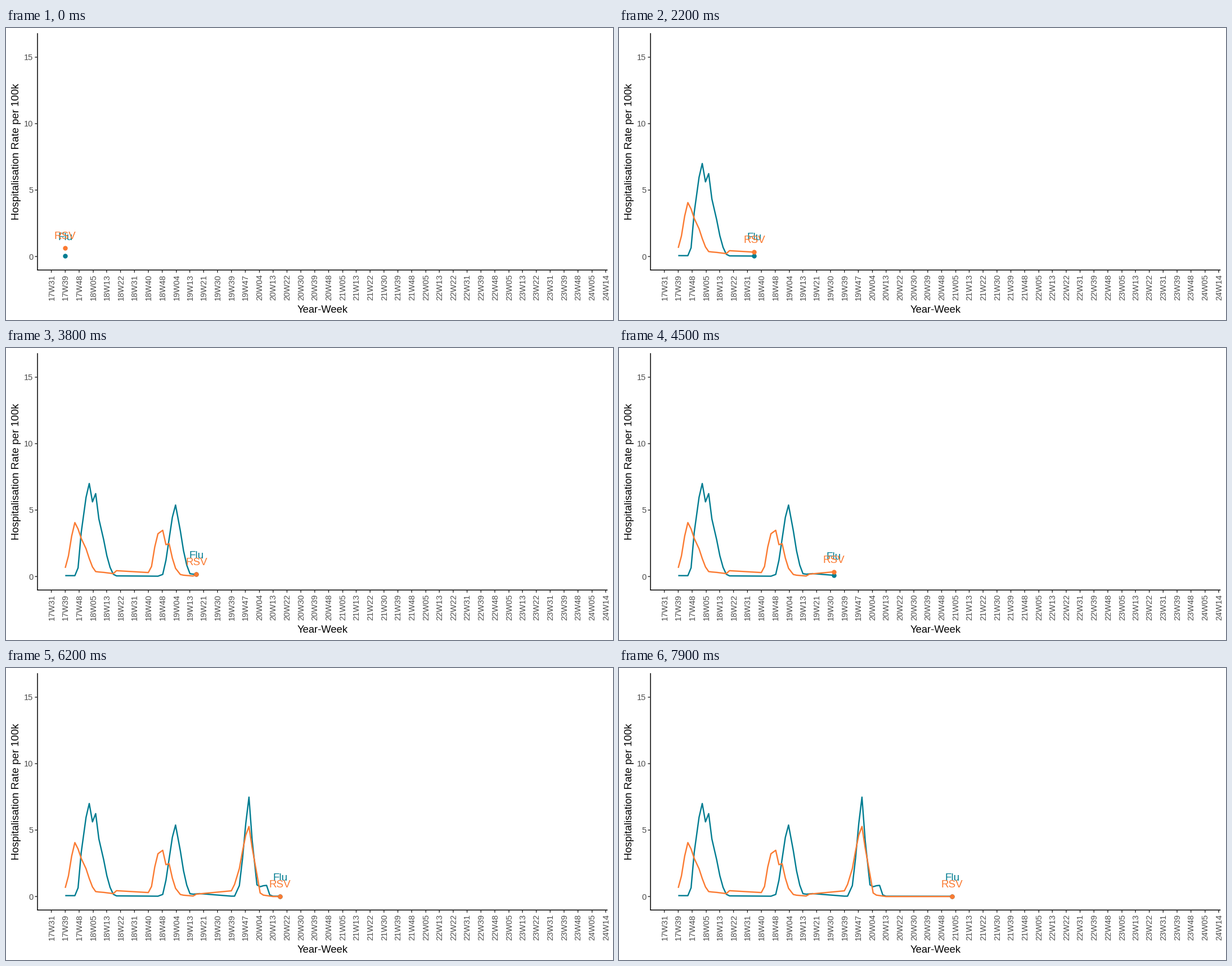
These frames come from a looping animation (1079 by 519 pixels, 8000 ms). A matplotlib script:

```python
import numpy as np
import matplotlib.pyplot as plt
from matplotlib.animation import FuncAnimation

W, H, DPI = 1079, 519, 64
PT = 72 / DPI                      # points per pixel
TEAL, ORANGE = "#007C91", "#FB7A31"
ZERO, UNIT = 406.2, 23.62          # pixel row of rate 0, pixels per rate unit
LEFT, BOTTOM = 56, 430.2
DAY = .4047                        # pixels per day

plt.rcParams["font.family"] = ["Liberation Sans", "DejaVu Sans"]


def row(rate):
    return ZERO - UNIT * rate


# Reporting seasons: first frame, first x, readings, where a week is skipped
SEASONS = [(0, 105.3, 16, (6, 11)), (24, 253.0, 16, (4, 9)),
           (48, 400.6, 13, (2, 7)), (72, 549.4, 8, (2,))]
frames = np.concatenate([f + np.arange(n) for f, _, n, _ in SEASONS])
xs = np.array([x + 5.7 * j + 2.8 * sum(j >= s for s in skips)
               for _, x, n, skips in SEASONS for j in range(n)])


def wave(k, peak, height, rise, rise_pow, fall, fall_pow):
    """A bump that reaches zero `rise` before and `fall` after its peak."""
    d = k - peak
    part = np.where(d < 0, np.abs(d / rise) ** rise_pow, np.abs(d / fall) ** fall_pow)
    return height * np.clip(1 - part, 0, None) ** 2


def rates(base, waves):
    floor = np.interp(frames, *zip(*base))
    return np.max([floor] + [wave(frames, *w) for w in waves], axis=0)


FLU = rates(
    [(0, .07), (15, .05), (30, .02), (39, .22), (48, .03), (79, .02)],
    [(7, 7.0, 3.6, 2, 3.1, 2), (9, 6.24, 1.5, 1, 6, 1),
     (32, 5.38, 4.5, 1.6, 5, 1),
     (53, 7.48, 4, 1.4, 2.7, 1.4), (58, .84, 8, 2, 1.6, 1)])
RSV = rates(
    [(0, .65), (14, .22), (15, .44), (24, .3), (37, .04), (38, .18), (48, .43), (60, 0)],
    [(3, 4.06, 3.8, 1.5, 7.4, 1.4),
     (28, 3.48, 3.9, 2.4, 3.55, 1.4), (30, 2.47, 1.2, 1, 4, 1),
     (53, 5.27, 5.6, 1.6, 3.6, 1.4)])

fig = plt.figure(figsize=(W / DPI, H / DPI), dpi=DPI, facecolor="white")
ax = fig.add_axes([0, 0, 1, 1])
ax.set_xlim(0, W)
ax.set_ylim(H, 0)
ax.axis("off")


def stroke(x, y, color, width=1.5, **kw):
    return ax.plot(x, y, color=color, lw=width * PT, snap=False,
                   solid_capstyle="butt", **kw)[0]


def write(x, y, text, size, color="black", ha="center", turn=0, **kw):
    return ax.text(x, y, text, fontsize=size * PT, color=color, ha=ha, va="baseline",
                   rotation=turn, rotation_mode="anchor", **kw)


def week_label(day):
    year = day.astype("datetime64[Y]")
    yday = (day - year.astype("datetime64[D]")).astype(int)
    wday = (day.astype(int) + 3) % 7
    return f"{str(year)[2:]}W{(yday + 7 - wday) // 7:02d}"


# Axes
stroke([LEFT, LEFT], [9.2, BOTTOM], "black")
stroke([LEFT - .7, 1069.3], [BOTTOM, BOTTOM], "black")

for rate in range(0, 16, 5):
    y = row(rate)
    stroke([LEFT - 4.6, LEFT - .7], [y, y], "#333333")
    write(48.3, y + 5.4, str(rate), 14.67, "#4D4D4D", ha="right")

days = np.arange("2017-08", "2024-05", 2, dtype="datetime64[M]").astype("datetime64[D]")
for day in days:
    x = 80.6 + DAY * (day - days[0]).astype(int)
    stroke([x, x], [BOTTOM + .7, BOTTOM + 4.6], "#333333")
    write(x + 4.9, 437.6, week_label(day), 14.67, "#4D4D4D", ha="right", turn=90)

write(562.3, 506.2, "Year-Week", 18.33)
write(23.4, 219.2, "Hospitalisation Rate per 100k", 18.6, turn=90)


class Series:
    def __init__(self, name, rate, color, lift, z):
        self.ys = row(rate)
        self.lift = lift
        self.line = stroke([], [], color, 2.4, zorder=3 + z, solid_joinstyle="round")
        self.dot = ax.plot([], [], "o", color=color, ms=8.4 * PT, mew=0,
                           snap=False, zorder=5 + z)[0]
        self.tag = write(0, 0, name, 18.9, color, zorder=7 + z)

    def show(self, i):
        x = np.interp(i, frames, xs)
        y = np.interp(i, frames, self.ys)
        past = frames < i
        self.line.set_data(np.append(xs[past], x), np.append(self.ys[past], y))
        self.dot.set_data([x], [y])
        self.tag.set_position((x, y - self.lift))
        return self.line, self.dot, self.tag


series = [Series("Flu", FLU, TEAL, 28, 0), Series("RSV", RSV, ORANGE, 16, 1)]


def draw(i):
    return [artist for s in series for artist in s.show(i)]


anim = FuncAnimation(fig, draw, frames=80, interval=100, repeat=True,
                     repeat_delay=0, init_func=lambda: draw(0), blit=False)
plt.show()
```
